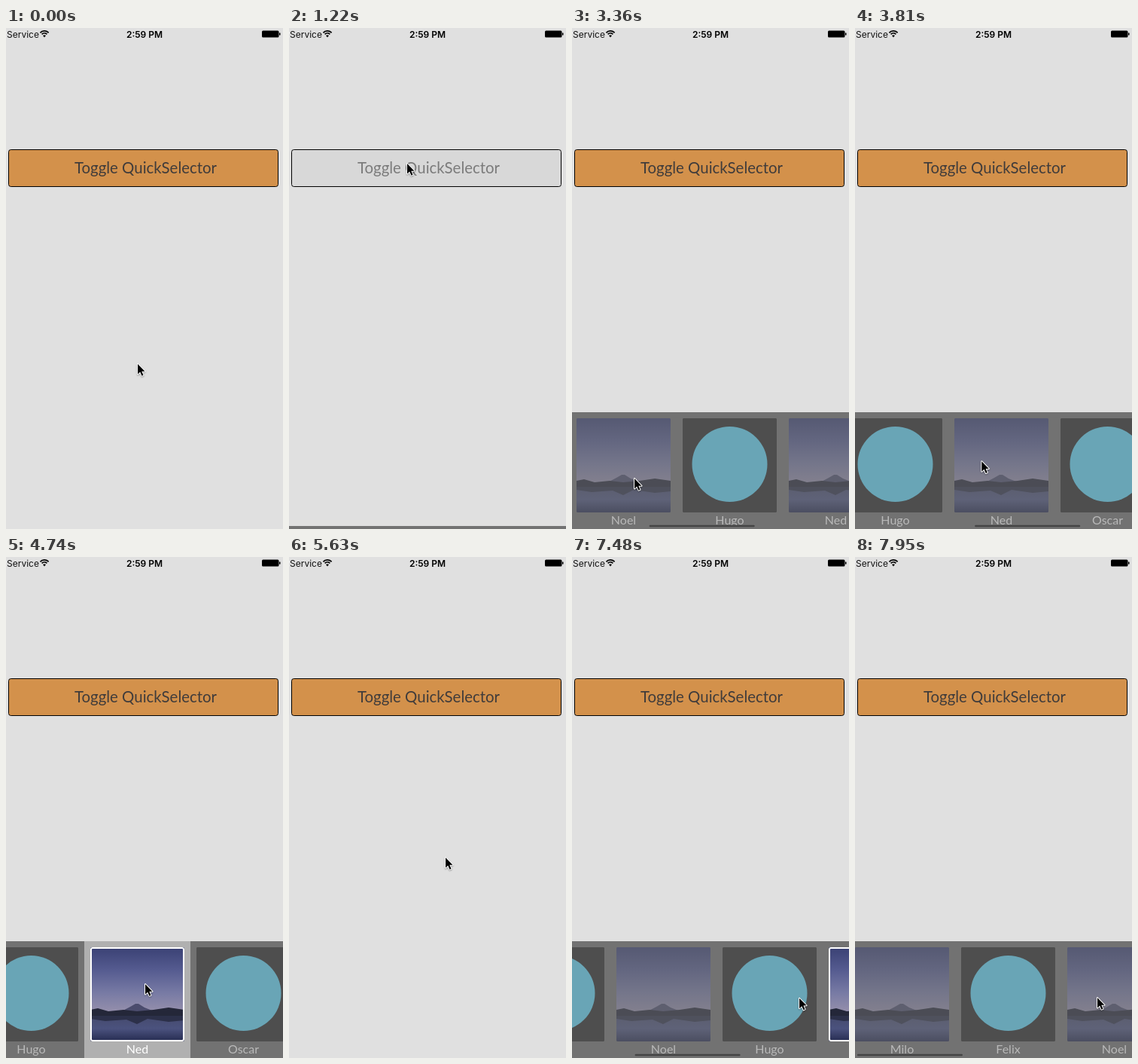
An HTML page with a canvas for the animation above (8 s loop, 368 px wide and 665 px high).

```html
<!DOCTYPE html>
<html lang="en">
<head>
<meta charset="utf-8">
<title>Quick selector</title>
<style>
  html, body { margin: 0; width: 100%; height: 100%; overflow: hidden; background: #e0e0e0; }
  canvas { display: block; }
</style>
</head>
<body>
<canvas id="stage" width="368" height="665"></canvas>
<script>
const ctx = document.getElementById('stage').getContext('2d');
const LOOP = 8000, WIDTH = 368, HEIGHT = 665;
const PANEL_HEIGHT = 155, ITEM_WIDTH = 141, TILE = 125;
const NAMES = ['Milo', 'Felix', 'Noel', 'Hugo', 'Ned', 'Oscar'];

const clamp = u => Math.max(0, Math.min(1, u));
const linear = u => u;
const smooth = u => u * u * (3 - 2 * u);
const easeInOut = u => u < 0.5 ? 2 * u * u : 1 - 2 * (1 - u) ** 2;
const easeOut = u => 1 - (1 - u) ** 2;
const progress = (t, start, length) => clamp((t - start) / length);
const within = (t, start, end) => t >= start && t < end;

// Pointer path: time, x, y, easing used to get there
const POINTER = [
  [0, 174, 445], [60, 173, 444], [230, 173, 444], [980, 156, 179], [1260, 156, 179],
  [1850, 158, 477], [2140, 126, 593], [2320, 126, 593], [2720, 260, 581],
  [2780, 256, 581, linear], [2900, 256, 581], [3180, 82, 597, linear], [3420, 82, 597],
  [3900, 176, 572], [4270, 176, 572], [4600, 184, 566], [4800, 184, 566],
  [5040, 195, 437, linear], [5390, 207, 398, easeOut], [5630, 207, 398], [6140, 170, 177],
  [6430, 170, 177], [6660, 187, 380, linear], [7070, 90, 590], [7250, 72, 592],
  [7500, 321, 584, linear], [LOOP, 321, 584]
];

function pointerAt(t) {
  const next = POINTER.findIndex(key => key[0] > t);
  const [t0, x0, y0] = POINTER[next - 1];
  const [t1, x1, y1, ease = smooth] = POINTER[next];
  const u = ease((t - t0) / (t1 - t0));
  return { x: x0 + (x1 - x0) * u, y: y0 + (y1 - y0) * u };
}

// Content follows the pointer during a drag, then coasts to rest
function scrollAt(t, x) {
  if (t < 2720) return 0;
  if (t < 3180) return 260 - x;
  if (t < 7250) return 178 + 282 * easeOut(progress(t, 3180, 860));
  if (t < 7500) return 460 - (x - 72);
  return 211 * (1 - easeOut(progress(t, 7500, 560)));
}

function panelOpenness(t) {
  const slide = start => easeInOut(progress(t, start, 450));
  return slide(1169) - slide(4900) + slide(6352);
}

function rect(x, y, w, h, color) {
  ctx.fillStyle = color;
  ctx.fillRect(x, y, w, h);
}

function roundRect(x, y, w, h, r) {
  ctx.beginPath();
  ctx.roundRect(x, y, w, h, r);
}

function polygon(points, color) {
  ctx.beginPath();
  points.forEach(([x, y]) => ctx.lineTo(x, y));
  ctx.closePath();
  ctx.fillStyle = color;
  ctx.fill();
}

function text(label, x, y, font, color, align = 'center') {
  ctx.font = font;
  ctx.fillStyle = color;
  ctx.textAlign = align;
  ctx.fillText(label, x, y);
}

function gradient(y0, y1, ...colors) {
  const fill = ctx.createLinearGradient(0, y0, 0, y1);
  colors.forEach((color, i) => fill.addColorStop(i / (colors.length - 1), color));
  return fill;
}

function drawStatusBar() {
  text('Service', 1, 12.5, '12px Inter, sans-serif', '#111', 'left');
  text('2:59 PM', 184, 12.5, '600 12px Inter, sans-serif', '#000');
  ctx.strokeStyle = '#000';
  ctx.lineWidth = 1.7;
  for (const radius of [4.6, 7.6]) {
    ctx.beginPath();
    ctx.arc(51, 11.5, radius, -Math.PI * 0.76, -Math.PI * 0.24);
    ctx.stroke();
  }
  polygon([[51, 12.5], [49, 10], [51, 9.2], [53, 10]], '#000');
  ctx.fillStyle = '#000';
  roundRect(340, 3.5, 22.5, 9, 1.5);
  ctx.fill();
  rect(363, 6.5, 1.5, 3, '#000');
}

function drawButton(pressed) {
  roundRect(3.5, 161.5, 358, 49, 3);
  ctx.fillStyle = pressed ? '#d8d8d8' : '#d3914b';
  ctx.fill();
  ctx.strokeStyle = '#000';
  ctx.lineWidth = 1;
  ctx.stroke();
  text('Toggle QuickSelector', 185.5, 193, '20.4px Lato, sans-serif', pressed ? '#7b7b7b' : '#403c3b');
}

function drawLandscape() {
  rect(0, 0, TILE, 90, gradient(0, 90, '#3a4174', '#555b90', '#777a a4'.replace(' ', ''), '#9a93ad'));
  polygon([[36, 88], [53, 79], [60, 75], [64, 75], [72, 80], [92, 88]], '#4b4c6d');
  polygon([[0, 83], [10, 81], [24, 85], [44, 83], [62, 85], [84, 83], [104, 80], [125, 83], [125, 92], [0, 92]], '#242739');
  rect(0, 91, TILE, 34, gradient(91, 125, '#454a6d', '#4b527e', '#252b50'));
  polygon([[0, 91], [125, 91], [125, 97], [104, 99], [76, 95], [62, 102], [48, 96], [20, 98], [0, 95]], '#2c3049');
}

function drawEmblem() {
  rect(0, 0, TILE, TILE, '#2a2a2a');
  ctx.beginPath();
  ctx.arc(62.5, 61, 50, 0, 2 * Math.PI);
  ctx.fillStyle = '#61dafb';
  ctx.fill();
}

function drawItem(index, selected, pressed) {
  if (pressed) rect(0, 0, ITEM_WIDTH, PANEL_HEIGHT, '#b0b0b0');
  ctx.save();
  ctx.globalAlpha = selected ? 1 : 0.5;
  text(NAMES[index], ITEM_WIDTH / 2, 149, '16px Lato, sans-serif', '#fff');
  ctx.translate(8, 8);
  roundRect(0, 0, TILE, TILE, 2);
  ctx.clip();
  // Opaque layers are blended once by pre-mixing with the panel afterwards
  ctx.globalAlpha = 1;
  if (index % 2) drawEmblem(); else drawLandscape();
  if (!selected) {
    ctx.globalAlpha = 0.5;
    rect(0, 0, TILE, TILE, '#727272');
  } else {
    roundRect(1, 1, TILE - 2, TILE - 2, 2);
    ctx.strokeStyle = '#fff';
    ctx.lineWidth = 2;
    ctx.stroke();
  }
  ctx.restore();
}

function drawPanel(t, scroll) {
  const top = HEIGHT - PANEL_HEIGHT * panelOpenness(t);
  if (top >= HEIGHT) return;
  const selected = t < 4650 ? 0 : 4;
  ctx.save();
  ctx.translate(0, top);
  rect(0, 0, WIDTH, PANEL_HEIGHT, '#727272');
  NAMES.forEach((name, i) => {
    ctx.save();
    ctx.translate(Math.round(i * ITEM_WIDTH - scroll), 0);
    drawItem(i, i === selected, i === 4 && within(t, 4650, 4920));
    ctx.restore();
  });
  const barVisible = within(t, 2830, 4060) || t > 7250;
  if (barVisible) {
    ctx.globalAlpha = 1 - progress(t, 3980, 80) * (t < 7000);
    ctx.fillStyle = '#454545';
    roundRect(scroll * 224 / 619, 149.8, 140, 2.4, 1.2);
    ctx.fill();
  }
  ctx.restore();
}

function drawPointer({ x, y }) {
  ctx.save();
  ctx.translate(x + 0.5, y + 0.5);
  ctx.shadowColor = 'rgba(0,0,0,.35)';
  ctx.shadowBlur = 2;
  ctx.shadowOffsetY = 1;
  ctx.lineWidth = 2;
  ctx.lineJoin = 'round';
  ctx.strokeStyle = '#fff';
  const outline = [[0.5, 0.5], [0.5, 14], [3.7, 11], [6, 16.2], [8, 15.3], [5.8, 10.3], [10, 10.2]];
  ctx.beginPath();
  outline.forEach(([px, py]) => ctx.lineTo(px, py));
  ctx.closePath();
  ctx.stroke();
  ctx.shadowColor = 'transparent';
  polygon(outline, '#000');
  ctx.restore();
}

function render(now) {
  const t = now % LOOP;
  const pointer = pointerAt(t);
  rect(0, 0, WIDTH, HEIGHT, '#e0e0e0');
  drawStatusBar();
  drawButton(within(t, 1100, 1280) || within(t, 6310, 6490));
  drawPanel(t, scrollAt(t, pointer.x));
  drawPointer(pointer);
}

let start;
function tick(now) {
  start ??= now;
  render(now - start);
  requestAnimationFrame(tick);
}
requestAnimationFrame(tick);
</script>
</body>
</html>
```
